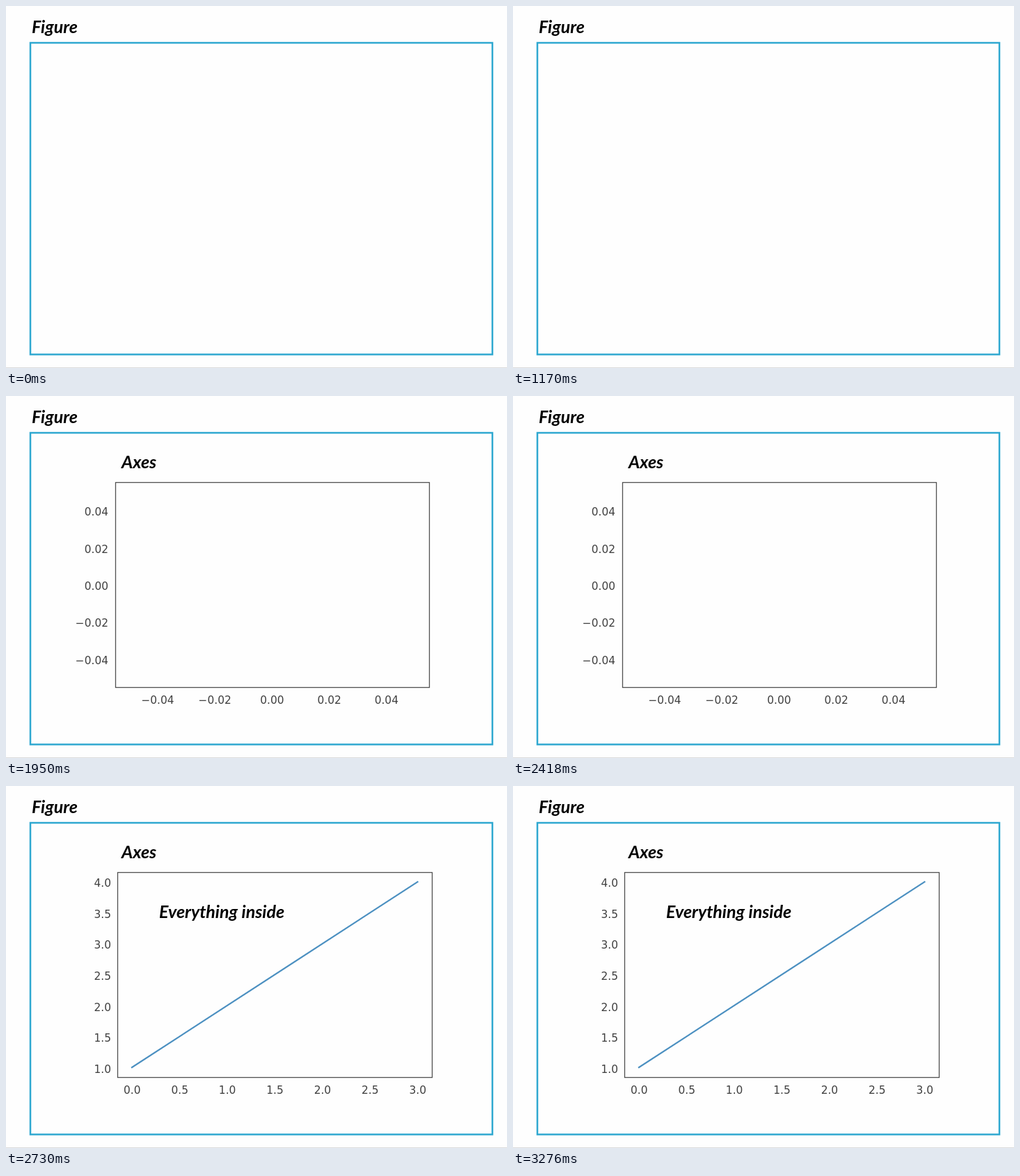
Write an HTML page that moves like this. It is 720 by 521 pixels and loops after 3.64 s.

```html
<!DOCTYPE html>
<html lang="en">
<head>
<meta charset="utf-8">
<title>Figure and axes</title>
<style>
  html, body { margin: 0; width: 100%; height: 100%; overflow: hidden; background: #fefefe; }
  svg { display: block; }
  .title { font: italic bold 25px Lato, sans-serif; fill: #000; }
  .tick { font: 15.4px "DejaVu Sans", sans-serif; fill: #404040; }
  .y { text-anchor: end; }
  .x { text-anchor: middle; }
  .box { fill: none; stroke: #505050; stroke-width: 1.3; }
</style>
</head>
<body>
<svg width="720" height="521" viewBox="0 0 720 521">
  <path d="M0 520.5H720" stroke="#dcdcdc"/>
  <rect x="35" y="53" width="664" height="448.5" fill="none" stroke="#2fa8d0" stroke-width="2.5"/>
  <text class="title" x="37" y="39">Figure</text>
  <text class="title" id="axesTitle" x="166" y="104">Axes</text>
  <g id="empty">
    <rect class="box" x="157.5" y="124.5" width="451" height="295"/>
  </g>
  <g id="plot">
    <rect class="box" x="160.5" y="124.5" width="452" height="295"/>
    <path d="M181 405L591.5 138" fill="none" stroke="#4a8fc0" stroke-width="2.2" stroke-linecap="square"/>
    <text class="title" x="220" y="190">Everything inside</text>
  </g>
</svg>
<script>
  const LOOP = 3640, AXES_AT = 1950, PLOT_AT = 2730;
  const byId = id => document.getElementById(id);
  const axesTitle = byId("axesTitle"), empty = byId("empty"), plot = byId("plot");

  function label(group, axis, x, y, value) {
    const text = document.createElementNS("http://www.w3.org/2000/svg", "text");
    text.setAttribute("class", "tick " + axis);
    text.setAttribute("x", x);
    text.setAttribute("y", y);
    text.textContent = value.replace("-", "\u2212");
    group.append(text);
  }

  for (let i = 0; i < 5; i++) {
    const value = ((i - 2) * 0.02).toFixed(2);
    label(empty, "y", 147, 385.7 - i * 53.4, value);
    label(empty, "x", 218 + i * 82.2, 443, value);
  }
  for (let i = 0; i < 7; i++) {
    label(plot, "y", 151, 412.8 - i * 44.6, (1 + i / 2).toFixed(1));
    label(plot, "x", 181.3 + i * 68.4, 443, (i / 2).toFixed(1));
  }

  const show = (node, on) => node.style.display = on ? "" : "none";

  function draw(now) {
    const t = now % LOOP;
    show(axesTitle, t >= AXES_AT);
    show(empty, t >= AXES_AT && t < PLOT_AT);
    show(plot, t >= PLOT_AT);
    requestAnimationFrame(draw);
  }
  draw(performance.now());
</script>
</body>
</html>
```
